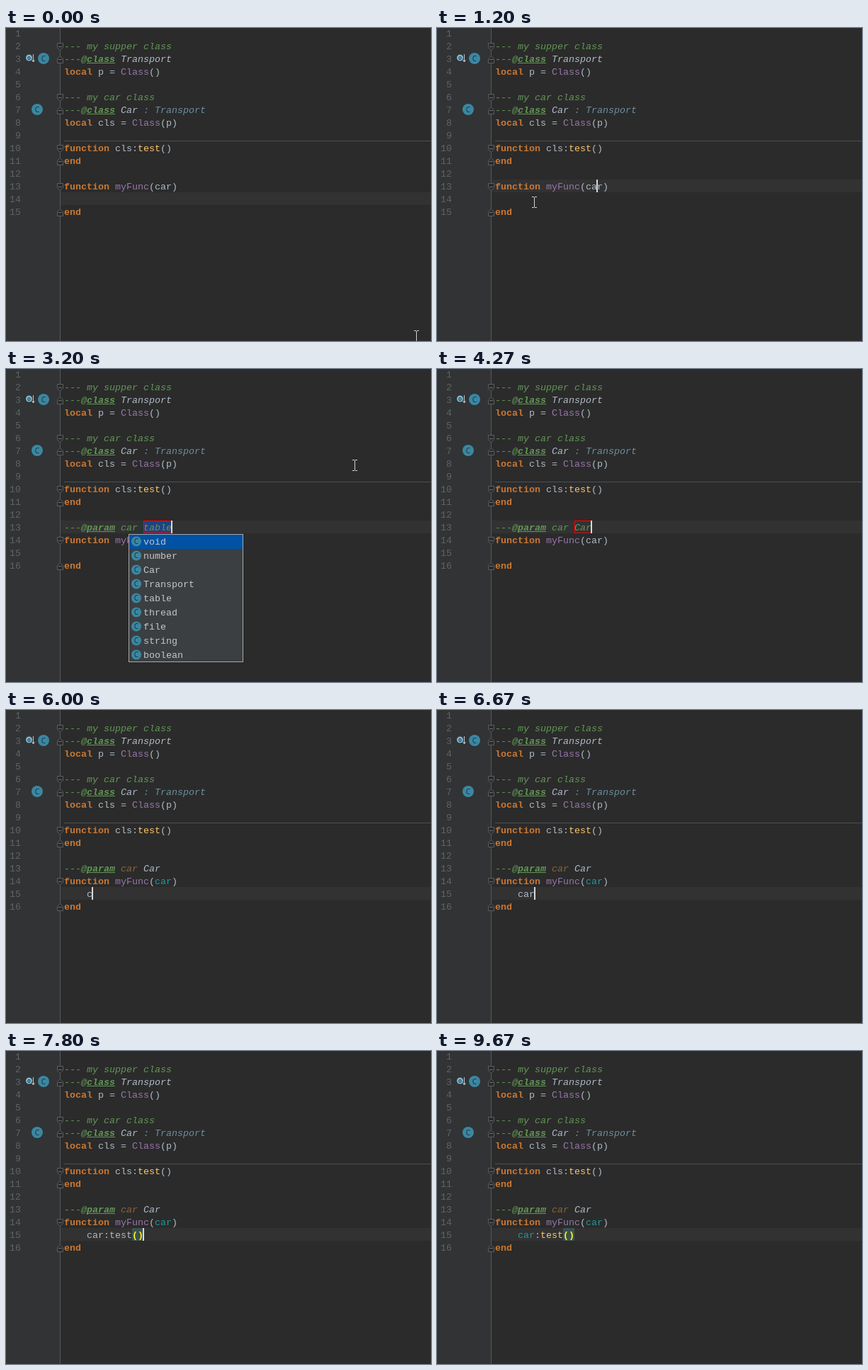
An HTML page with a canvas that plays this animation: 600x442 px, repeating every 9790 ms.

```html
<!DOCTYPE html>
<html lang="en">
<head>
<meta charset="utf-8">
<title>Parameter annotation</title>
<style>
html, body { margin: 0; width: 100%; height: 100%; overflow: hidden; background: #2b2b2b; }
canvas { display: block; }
</style>
</head>
<body>
<canvas id="stage" width="600" height="442"></canvas>
<script>
const ctx = document.getElementById('stage').getContext('2d');
const LOOP = 9790, LEFT = 82, CHAR = 8, ROW = 18;
const MONO = '13.333px "Liberation Mono", monospace';
const UI = '12.3px "Noto Sans", sans-serif';
const PLAIN = '#b0bbc7', GREEN = '#629755', TEAL = '#20999d', PURPLE = '#9876aa';

// Text styles: [colour, font prefix, underlined]
const styles = {
  plain: [PLAIN, ''],
  key: ['#cc7832', 'bold '],
  doc: [GREEN, 'italic '],
  tag: [GREEN, 'italic bold ', true],
  type: [PLAIN, 'italic '],
  base: ['#6b8fa0', 'italic '],
  value: ['#8a653b', 'italic '],
  call: [PURPLE, ''],
  method: ['#ffc66d', ''],
  param: [TEAL, ''],
  brace: ['#ffef28', 'bold ']
};

const colX = col => LEFT + col * CHAR;
const lineTop = line => line * ROW - 20;
const baseline = line => line * ROW - 6;

function rect(x, y, w, h, color) {
  ctx.fillStyle = color;
  ctx.fillRect(x, y, w, h);
}

function text(str, x, y, color, font, align = 'left') {
  ctx.font = font;
  ctx.fillStyle = color;
  ctx.textAlign = align;
  ctx.fillText(str, x, y);
}

function frame(x, y, w, h, color) {
  ctx.strokeStyle = color;
  ctx.lineWidth = 1;
  ctx.strokeRect(x + .5, y + .5, w - 1, h - 1);
}

function path(points, color, fill) {
  ctx.beginPath();
  points.forEach(([x, y]) => ctx.lineTo(x, y));
  ctx.lineWidth = 1;
  if (fill) {
    ctx.closePath();
    ctx.fillStyle = fill;
    ctx.fill();
  }
  if (color) {
    ctx.strokeStyle = color;
    ctx.stroke();
  }
}

function disc(x, y, r, color) {
  ctx.fillStyle = color;
  ctx.beginPath();
  ctx.arc(x, y, r, 0, 7);
  ctx.fill();
}

function badge(x, y, r, letter = 'C', color = '#3b87a2') {
  disc(x, y, r, color);
  text(letter, x, y + 3.5, '#20333c', '10px "Noto Sans", sans-serif', 'center');
}

// Draws "style:text" pieces one after another on an editor line.
function code(line, ...pieces) {
  let x = LEFT;
  const y = baseline(line);
  for (const piece of pieces) {
    const cut = piece.indexOf(':');
    const [color, prefix, underlined] = styles[piece.slice(0, cut)];
    const str = piece.slice(cut + 1);
    text(str, x, y, color, prefix + MONO);
    if (underlined) rect(x, y + 1, str.length * CHAR, 1, color);
    x += str.length * CHAR;
  }
}

function mark(line, col, count, color) {
  rect(colX(col), lineTop(line), count * CHAR, ROW, color);
}

function caret(line, col) {
  rect(colX(col) - 1, lineTop(line), 2, ROW, '#d8d8d8');
}

function fold(line, isEnd) {
  const y = line * ROW - 9.5, s = isEnd ? -1 : 1;
  path([[72.5, y - 5 * s], [80.5, y - 5 * s], [80.5, y + s], [76.5, y + 5 * s], [72.5, y + s], [72.5, y - 5 * s]],
    '#5c5e60', '#2b2b2b');
  rect(74, y - .5, 5, 1, '#6c6e70');
}

function gutter(lastLine) {
  rect(0, 0, 76, 442, '#313335');
  rect(76, 0, 1, 442, '#555759');
  for (let n = 1; n <= lastLine; n++) text(n, 21, baseline(n), '#606366', MONO, 'right');
  const shift = lastLine - 15;
  [2, 6, 10, 13 + shift].forEach(n => fold(n, false));
  [3, 7, 11, 15 + shift].forEach(n => fold(n, true));
  badge(53, 43, 8);
  badge(44, 115, 8);
  disc(32.5, 42, 4.5, '#7fb8d2');
  text('o', 32.5, 45, '#24485a', 'bold 8px "Noto Sans", sans-serif', 'center');
  path([[38.5, 37], [38.5, 47.5]], '#c0c4c8');
  path([[36.5, 45], [38.5, 48], [40.5, 45]], '#c0c4c8');
}

// Completion list under a line; items are [letter, label].
function completion(line, x, width, items, typed, options = {}) {
  const { indent = 21, color, hint } = options;
  const y = line * ROW - 1;
  const h = items.length * 20 + (hint ? 16 : 1);
  rect(x, y, width, h, '#3c3f41');
  rect(x + 1, y + 1, width - 2, 20, '#0052a4');
  items.forEach(([letter, label], i) => {
    const mid = y + 10.5 + i * 20;
    badge(x + 11, mid, 7, letter, color);
    if (indent > 21) disc(x + 27, mid, 3, '#62b543');
    text(label, x + indent, mid + 4.5, '#c4c6c8', MONO);
    text(label.slice(0, typed), x + indent, mid + 4.5, '#d17ad6', MONO);
  });
  if (hint) {
    const base = y + h - 4;
    text('Ctrl+Down and Ctrl+Up will move caret down and up in the editor', x + 5, base, '#a0a2a4', '11px "Noto Sans", sans-serif');
    text('>>', x + 370, base, '#589df6', '11px "Noto Sans", sans-serif');
  }
  frame(x, y, width, h, '#a6a8aa');
}

function intentionMenu() {
  rect(225, 231, 220, 24, '#3c3f41');
  rect(227, 233, 216, 20, '#4b6eaf');
  frame(225, 231, 220, 24, '#8a8c8e');
  [238, 241, 244].forEach(y => rect(235, y, 11, 1, '#b9b58a'));
  path([[238, 248], [239, 245], [244, 239], [247, 241], [241, 247]], null, '#62a55c');
  text('Create parameter annotation', 253, 247, '#c3c5c8', UI);
  path([[428, 239], [434, 243], [428, 247]], null, '#ffffff');
}

function bulb() {
  disc(96, 204.5, 5, '#e8c25a');
  rect(94, 209, 4, 5, '#a0a2a4');
}

function beam(x, y) {
  const c = '#d4d4d4';
  rect(x, y - 6, 1, 13, c);
  for (const edge of [y - 8, y + 7]) {
    rect(x - 3, edge, 3, 1, c);
    rect(x + 1, edge, 3, 1, c);
  }
  rect(x, y - 7, 1, 1, c);
  rect(x, y + 6, 1, 1, c);
}

const lerp = (a, b, k) => Math.round(a + (b - a) * k);

function pointer(t) {
  if (t < 1070) {
    const k = t < 70 ? 0 : Math.min(1, (Math.floor((t - 70) / 66.67) + 1) / 13);
    const ease = k * k * (3 - 2 * k);
    return [lerp(579, 226, ease), lerp(435, 217, ease)];
  }
  if (t < 3670) {
    const stops = [[190, 232], [137, 246], [300, 190], [440, 146], [503, 137], [492, 136]];
    return stops[Math.min(5, Math.floor((t - 1070) / 80))];
  }
  if (t >= 9070 && t < 9530) {
    const k = Math.floor((t - 9070) / 65.8) / 6;
    return [lerp(481, 133, k), lerp(166, 436, k)];
  }
}

function header() {
  code(2, 'doc:--- my supper class');
  code(3, 'doc:---@', 'tag:class', 'type: Transport');
  code(4, 'key:local', 'plain: p = ', 'call:Class', 'plain:()');
  code(6, 'doc:--- my car class');
  code(7, 'doc:---@', 'tag:class', 'type: Car', 'base: : Transport');
  code(8, 'key:local', 'plain: cls = ', 'call:Class', 'plain:(p)');
  rect(LEFT, 159, 518, 1, '#4d4f51');
  code(10, 'key:function', 'plain: cls:', 'method:test', 'plain:()');
  code(11, 'key:end');
}

function beforeAnnotation(t) {
  if (t >= 1470) mark(13, 16, 3, '#344134');
  code(13, 'key:function', 'call: myFunc', 'plain:(car)');
  code(15, 'key:end');
  if (t >= 1070 && t < 2070) caret(13, 18);
  if (t >= 1870 && t < 2270) bulb();
  if (t >= 2270) intentionMenu();
}

function annotation(t) {
  const word = t < 3670 ? 'table' : t < 4270 ? 'C' : 'Car';
  const resolved = t >= 4600;
  if (t < 5130) {
    if (t < 3670) mark(13, 14, 5, '#214283');
    else if (resolved) mark(13, 14, 3, '#344134');
  }
  code(13, 'doc:---@', 'tag:param', (resolved ? 'value' : 'doc') + ': car', (resolved ? 'type: ' : 'doc: ') + word);
  if (t < 5130) {
    frame(colX(14), lineTop(13), word.length * CHAR + 1, ROW, '#ff0000');
    caret(13, 14 + word.length);
  }
  const paren = t >= 5130 && t < 5270 ? 'brace' : 'plain';
  if (paren === 'brace') {
    mark(14, 15, 1, '#3b514d');
    mark(14, 19, 1, '#3b514d');
  }
  code(14, 'key:function', 'call: myFunc', paren + ':(', (resolved ? 'param' : 'plain') + ':car', paren + ':)');
  if (paren === 'brace') caret(14, 19);
  code(16, 'key:end');
  if (t >= 3200 && t < 3670) {
    const names = ['void', 'number', 'Car', 'Transport', 'table', 'thread', 'file', 'string', 'boolean'];
    completion(13, 173, 162, names.map(n => ['C', n]), 0);
  } else if (t >= 3670 && t < 4270) {
    completion(13, 173, 162, [['C', 'Car']], 1);
  }
}

function callLine(t) {
  const typed = t < 6000 ? '' : t < 6670 ? 'c' : t < 6870 ? 'car' : t < 7670 ? 'car:' : 'car:test';
  const done = t >= 7670, resolved = t >= 8130;
  if (done) mark(15, 12, 2, '#3b514d');
  if (resolved) code(15, 'plain:    ', 'param:car', 'plain::', 'method:test', 'brace:()');
  else code(15, 'plain:    ' + typed, 'brace:' + (done ? '()' : ''));
  const blinkedOff = t >= 9670 || (t >= 8670 && t < 9170);
  if (!blinkedOff) caret(15, 4 + typed.length + (done ? 2 : 0));
}

function callCompletion(t) {
  if (t >= 6130 && t < 6670) {
    const items = [['p', 'car'], ['v', 'cls'], ['f', 'collectgarbage'], ['v', 'coroutine'], ['f', 'Class']];
    completion(15, 93, 456, items, 1, { hint: true, color: '#b08a4e' });
  } else if (t >= 6930 && t < 7670) {
    const names = ['test()', 'Class', 'Transport', 'Car', 'cls', 'myFunc', 'car', 'local', 'function'];
    completion(15, 109, 456, names.map(n => ['m', n]), 0, { indent: 37, color: '#c77183' });
  }
}

function draw(t) {
  const annotated = t >= 3130;
  const current = t < 1070 ? 14 : t < 5130 ? 13 : t < 5270 ? 14 : 15;
  rect(0, 0, 600, 442, '#2b2b2b');
  rect(77, lineTop(current), 523, ROW, '#323232');
  if (t >= 4600 && t < 5270) mark(7, 10, 3, '#344134');
  gutter(annotated ? 16 : 15);
  header();
  if (!annotated) {
    beforeAnnotation(t);
  } else {
    annotation(t);
    if (t >= 5270) callLine(t);
    callCompletion(t);
  }
  const spot = pointer(t);
  if (spot) beam(...spot);
}

const start = performance.now();
function tick() {
  draw((performance.now() - start) % LOOP);
  requestAnimationFrame(tick);
}
tick();
</script>
</body>
</html>
```
